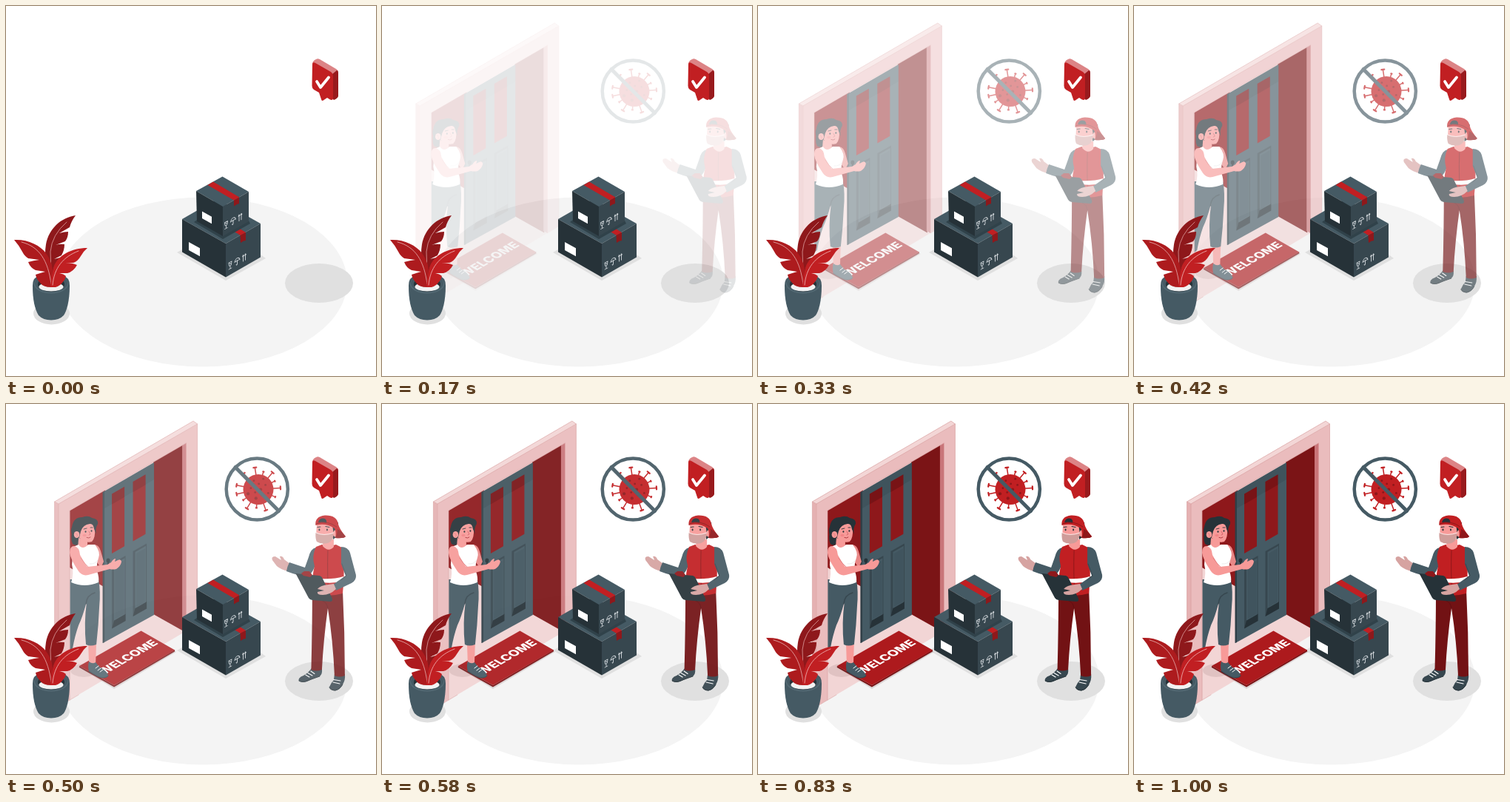
Write an HTML page with a canvas that moves like this. It is 500 px wide and 500 px high and loops after 1.04 s.

```html
<!DOCTYPE html>
<html lang="en">
<head>
<meta charset="utf-8">
<title>Doorstep delivery</title>
<style>
html, body { margin: 0; width: 100%; height: 100%; overflow: hidden; background: #fff; }
canvas { display: block; width: 500px; height: 500px; }
</style>
</head>
<body>
<canvas id="stage"></canvas>
<script>
const SIZE = 500, LOOP = 1040, STEP = 1000 / 24;
const dpr = window.devicePixelRatio || 1;
const INK = '#263238', SLATE = '#37474f', STEEL = '#455a64';
const RED = '#c11f22', DEEP = '#7b1416', WINE = '#8e181b';
const SKIN = '#f79a98', GLOVE = '#d6a3a1', SHADE = '#e0e0e0';
const PINK = '#eabcbd', PALE = '#f2d5d5', ROSE = '#c97579';

const stage = document.getElementById('stage');
const layer = document.createElement('canvas');
stage.width = stage.height = layer.width = layer.height = SIZE * dpr;
const view = stage.getContext('2d'), buffer = layer.getContext('2d');
let g = view;

const cache = {};
const shape = d => cache[d] || (cache[d] = new Path2D(d));

function fill(color, d) {
  g.fillStyle = color;
  g.fill(shape(d));
}

function line(color, width, d) {
  g.strokeStyle = color;
  g.lineWidth = width;
  g.lineCap = g.lineJoin = 'round';
  g.stroke(shape(d));
}

function oval(color, x, y, rx, ry = rx) {
  g.fillStyle = color;
  g.beginPath();
  g.ellipse(x, y, rx, ry, 0, 0, Math.PI * 2);
  g.fill();
}

// Upright panel whose top and bottom edges follow the isometric slope
function panel(color, x, y, w, h, slope = -0.57) {
  g.fillStyle = color;
  g.beginPath();
  g.moveTo(x, y);
  g.lineTo(x + w, y + w * slope);
  g.lineTo(x + w, y + w * slope + h);
  g.lineTo(x, y + h);
  g.fill();
}

function ground() {
  oval('#f4f4f4', 266, 373, 195, 114.5);
  oval(SHADE, 423, 374.5, 46, 26.5);
  oval(SHADE, 61.5, 415.5, 24.5, 15);
  fill(SHADE, 'M238 329L231 333 297 371 351 341 344 336Z');
}

function careIcons(x, y) {
  g.save();
  g.transform(1, -0.57, 0, 1, x, y);
  line('#d5dade', 0.8, 'M-2-4H2L1.5 0Q0 2-1.5 0ZM0 1V5M-2 5H2M-1-3L1-1');
  line('#d5dade', 0.9, 'M6 0Q7-4 9-4Q12-4 13 0Q11-1 9.5 0Q8-1 6 0M9.5-1V4Q9 6 8 4');
  line('#d5dade', 0.9, 'M17.5 5V-3M20.5 5V-3M16.6-1.8L17.5-3.5 18.4-1.8M19.6-1.8L20.5-3.5 21.4-1.8');
  g.restore();
}

function boxes() {
  fill(STEEL, 'M238 288L285 261 344 294 297 321Z');
  fill(INK, 'M238 288L297 321V366.500L238 332.500Z');
  fill(SLATE, 'M297 321L344 294V339.500L297 366.500Z');
  fill(RED, 'M304.500 302.500L312 298.500 324 306 317 310Z');
  fill(WINE, 'M316.500 310L324 306V317L321 317.500 317 320Z');
  panel('#fff', 247, 319, 15, 11, 0.55);
  careIcons(303, 350);
  fill('#30424a', 'M258 289L293 309 328 290 330 294 293 315 254 292Z');
  fill(STEEL, 'M292.500 230.500L328 251 293 271 257 250Z');
  fill(INK, 'M257 250L293 271V311L258 291Z');
  fill(SLATE, 'M293 271L328 251V291L293 311Z');
  fill(RED, 'M272.500 242L280 237.500 315.500 258.500 308 262.500Z');
  fill(WINE, 'M308 262.500L315 258.500V267L312 268 308 270.500Z');
  panel('#fff', 265, 277.5, 13, 9.5, 0.55);
  careIcons(297.5, 295.5);
}

function plant() {
  fill(STEEL, 'M36 378Q36 366 45 365H77Q86 366 86 378C86 399 82 412 78 418Q72 424.500 61 424.500Q50 424.500 44 418C39 410 36 397 36 378Z');
  oval('#546a74', 61, 376, 23, 12.5);
  oval(STEEL, 61, 375, 22, 12);
  oval(INK, 61, 376, 18, 10);
  oval('#f2f2f2', 61, 379.5, 16.5, 6);
  fill(WINE, 'M94 283C74 286 58 301 54 322C51 340 55 358 59 374L64 370 65 352Q71 347 73 340L65 342 75 337Q79 330 79 322Q73 321 67 323L80 318Q84 313 84 305Q79 305 72 307L86 299Q88 291 94 283Z');
  line('#dda0a0', 0.8, 'M82 292Q62 309 60 332L61 360');
  fill('#ad1b1e', 'M11 316C29 315 46 323 54 334Q61 343 63 356L61 380Q50 380 46 374Q41 369 40 363Q46 361 53 359L40 357Q33 354 30 346Q37 344 45 343L30 341Q25 338 22 332Q18 324 11 316Z');
  line('#e7b2b2', 0.8, 'M21 319C45 325 57 344 61 376');
  fill(RED, 'M110 327C88 327 71 337 65 351Q61 364 60 380L67 380Q73 378 76 374Q80 370 81 365Q78 362 72 361L83 361Q91 359 96 350Q90 347 80 347L91 347Q97 345 101 338Q104 332 110 327Z');
  line('#f0bcbc', 0.8, 'M98 331C77 339 65 354 63 377');
}

function badge() {
  fill('#dc8486', 'M414 79Q414 75 417 73L420 71.500Q422 71 424 72L446 85Q448 86 448.500 88L442 93Z');
  fill('#981a1d', 'M441 92L447 87Q449 87 449 90V122Q448 125 443 127L440 124Z');
  fill(RED, 'M414 79Q414 75 418 77L439 89Q442 91 442 95V124Q442 128 438 126.500L434 124 428 128Q426 128 426 126L423 117 416 113Q413.500 111 413.500 108Z');
  line('#fff', 3.8, 'M420 102L425 110 436 96.500');
}

function spike(deg, r, cap) {
  g.save();
  g.translate(341, 115.5);
  g.rotate(deg * Math.PI / 180);
  line(RED, 1.5, `M17 0H${r}`);
  line(RED, 2.2, `M${r}-${cap}V${cap}`);
  g.restore();
}

function virus() {
  for (const a of [-99, -50, -4, 70, 121, 168, 191]) spike(a, 30, 2);
  for (const a of [-74, -27, 24, 96, 145]) spike(a, 25, 0.6);
  spike(227, 29, 2);
  oval(RED, 341, 115.5, 20.5);
  for (let i = 0; i < 11; i++) {
    const a = i * 2.4, r = 4.9 * Math.sqrt(i + 0.4);
    oval('#8d171a', 341 + r * Math.cos(a), 115.5 + r * Math.sin(a), i % 3 ? 1.4 : 2.1);
  }
  g.strokeStyle = STEEL;
  g.lineWidth = 4.5;
  g.beginPath();
  g.arc(339.3, 115, 41.6, 0, Math.PI * 2);
  g.stroke();
  line(STEEL, 5, 'M310 85.500L368.600 144.500');
}

function doorway() {
  fill(PALE, 'M92 144L249 53V307L92 400Z');
  fill(WINE, 'M92 144L140 116V248L92 221Z');
  fill(DEEP, 'M205 78L245 55V306.500L205 284Z');

  // Open door
  fill(STEEL, 'M137 119L206 79V285L137 323Z');
  fill('#2f3f47', 'M136.500 119L139 118V322L136.500 323Z');
  fill('rgba(38,50,56,.18)', 'M139 118L206 79V102L139 141Z');
  for (const [x, y] of [[149, 121.5], [177.5, 105]]) {
    panel(WINE, x, y, 17, 80.5);
    panel('rgba(70,10,14,.3)', x, y, 17, 14);
    panel(SLATE, x, y + 94, 18.5, 88);
    fill(INK, `M${x} ${y + 182}L${x + 3} ${y + 171} ${x + 18.5} ${y + 162}V${y + 171.5}Z`);
    panel(STEEL, x + 3, y + 95, 14.5, 76);
    panel('#40545e', x + 4.5, y + 97, 12, 72);
  }
  oval(INK, 144, 211.5, 2.5, 3);
  line(INK, 2, 'M144 212V217');

  // Casing
  fill(PINK, 'M77 134L264.500 27V298L249 307.500V53L92 144V400L77 409Z');
  fill(ROSE, 'M244 56L249.500 52.500V307L244 304Z');
  fill('#f3d6d6', 'M71.500 132L259 23 264.500 27 77 135Z');
  fill('#e5b1b2', 'M71.500 132L77 135V408L71.500 405Z');
  line('#d99fa0', 0.7, 'M71.500 405V132L259 23 264.500 27 77 135V408M71.500 132L77 135M264.500 27V298M92 400V144L249 53');
  line('#dfa9aa', 0.7, 'M77 409L104 393');
}

function mat() {
  fill('rgba(90,60,60,.16)', 'M103 355L152 385 236 335 232 332Z');
  fill(DEEP, 'M105 354L152 380 234 332V334.500L152 382.500 105 356Z');
  fill('#ad1a1d', 'M105 354L188.500 306.500 234 332.500 152 380Z');
  g.save();
  g.transform(0.866, -0.5, 0.866, 0.5, 170.5, 342);
  g.fillStyle = '#fff';
  g.font = '800 16.2px Inter, Roboto, sans-serif';
  g.textAlign = 'center';
  g.textBaseline = 'alphabetic';
  g.fillText('WELCOME', 0, 5.9);
  g.restore();
  oval('rgba(70,30,30,.1)', 111, 360, 18, 9);
}

function woman() {
  // Legs and shoe
  fill(SKIN, 'M117 322H128L127 352Q122 355 118 351Z');
  fill(STEEL, 'M118 348Q123 352 127 349L132 355Q142 361 144 366Q143 371 135 370Q126 366 118 361Q116 354 118 348Z');
  line(SLATE, 1.2, 'M118 361Q129 369 136 370Q142 370 144 367');
  line('#fff', 1, 'M127 357L131 354M130 360L134 357M133 362L137 359');
  fill(STEEL, 'M92.500 237H131Q134 253 132 274Q131 299 128 325Q120 328 114 325Q111 296 115 267Q109 289 104 299Q99 313 96 330L92.500 333Z');
  line(SLATE, 1.5, 'M114 270Q115 258 126 255');

  // Hair, far arm, torso
  fill(INK, 'M97 166Q92 181 96 189Q101 193 106 188L110 166Z');
  fill('#e98786', 'M126 190Q132 191 134 199L138 213 134 221 124 207Z');
  fill(SKIN, 'M104 181L116 184 116 193Q111 200 103 194Z');
  fill('#fff', 'M97 193L104 190Q109 198 117 190L126 190Q134 200 131 208Q128 215 129 226Q132 234 131 241Q112 249 94 241Q98 229 95 217Z');
  line('#e7e7e7', 0.8, 'M119 216Q126 217 130 211');

  // Near arm
  fill(SKIN, 'M98 192Q92 192 92 201Q93 210 104 226Q109 233 117 231L146 223Q150 224 155 223Q161 219 162 213Q161 209 157 211L153 213 154 209Q151 209 148 214L143 217 116 220Q112 215 106 204Q105 193 98 192Z');
  line('#dc7779', 0.8, 'M107 208Q112 216 117 220');

  // Head
  fill(SKIN, 'M104 165Q106 157 116 157Q126 158 126 168Q127 181 122 186Q115 188 109 184L103 179Z');
  fill(INK, 'M95 166Q97 153 109 153Q117 150 122 154Q131 155 130 162Q126 168 128 176L125 169Q124 161 119 162Q110 163 107 172L105 180Q98 181 95 176Q93 171 95 166Z');
  oval(SKIN, 101.5, 176.5, 3.8, 4.5);
  line('#d87376', 0.7, 'M100 175Q103 175 102 179');
  oval(INK, 113.5, 172.5, 1, 1.3);
  oval(INK, 121.5, 171.5, 1, 1.3);
  line(INK, 0.9, 'M111 169L115 168M120 167L123 167');
  line('#c95058', 0.7, 'M118 172L120 176 118 177');
  line('#a92d35', 0.9, 'M115 180.500Q118 182 120 180');
  oval('rgba(232,94,103,.35)', 112, 177.5, 2.5, 1.8);
}

function shoes() {
  fill(SLATE, 'M407 357L421 358Q422 365 418 368Q408 371 401 375Q394 377 390 374.500Q388 370 396 367Q403 363 407 357Z');
  fill(SLATE, 'M438 365L452 365Q453 373 449 379Q446 386 439 387.500Q432 387 431 382.500Q433 377 437 373Z');
  line(INK, 1, 'M390 374Q395 377 401 374L418 368M431 383Q433 387 439 387Q446 385 449 379');
  line('#fff', 1.2, 'M399 366L404 369M402 363.500L408 367M406 361L411 364.500M436 376L445 378M437 372.500L446 374');
}

function courier() {
  shoes();
  fill('#721214', 'M408 250H449Q452 309 452 367Q445 370 438 367Q436 320 429 276Q423 319 421 359Q413 362 406.500 359Q408 303 408 250Z');
  line('#5f0f11', 1, 'M429 276Q428 268 422 266');

  // Far arm with open hand
  fill(GLOVE, 'M378 216L370 210Q368 205 364 206L366 211 358 206Q352 206 354 211L360 219Q366 224 375 226Z');
  fill(STEEL, 'M413 194Q406 195 403 207L398 221 377 214Q374 220 373 226Q391 233 402 233Q409 229 415 210Z');

  // Torso
  fill(RED, 'M413 193L421 190Q430 193 440 190L448 194Q453 225 449 256Q427 262 408 256Q407 235 411 219Q407 205 413 193Z');
  fill(SKIN, 'M423 183H437V193Q430 201 422 192Z');
  line('#8f171a', 1, 'M429 198Q428 230 430 258');
  fill('#fff', 'M420 236Q437 237 450 233V239Q437 243 421 241Z');

  // Clipboard
  fill(INK, 'M385.500 229L418 232Q421 233 422 236L435 263Q436 267 432 267L408 265Q405 265 403 262Z');
  fill(WINE, 'M393 229L397 226 404 226 408 231 405 234 396 232Z');

  // Near arm
  fill(STEEL, 'M447 193Q456 193 459 201L467 231Q468 238 461 242L440 252 436 244 453 232 447 216Z');
  line(SLATE, 1, 'M448 216L454 232 447 238');
  fill(GLOVE, 'M415 250Q419 245 430 244L437 243 440 250Q432 258 422 258Q414 258 415 254L424 252Z');

  // Head
  fill(INK, 'M432 160H443L443 178 436 183Z');
  fill(SKIN, 'M414 164Q423 157 435 162L437 177Q434 187 426 187Q415 186 413 179Z');
  oval(SKIN, 440, 175, 3.8, 4.8);
  fill('#cf9d9a', 'M412.500 174Q423 179 436 175Q437 185 429 188Q420 190 414 186Q412 182 412.500 174Z');
  line('#fff', 0.8, 'M413 174Q423 179 437 174');
  oval(INK, 417.5, 170, 1, 1.4);
  oval(INK, 428, 170, 1, 1.4);
  line(INK, 1.1, 'M415 166.500L419 166M426 165.500L431 166.500');

  // Cap worn backwards
  fill(RED, 'M412.500 164Q411 152 425 150.500Q441 150 443 162Q444 168 453 179Q451 182 439 181Q441 174 438 168Q426 160 412.500 164Z');
  fill('#8f171a', 'M442 169Q447 171 453 179Q451 182 439 181Q442 176 442 169Z');
  fill(INK, 'M416 160Q418 153 425 155Q428 157 427 161Q422 159 416 160Z');
  line('#8f171a', 1, 'M413 162Q427 156 441 166');
}

// cubic-bezier(.36, -.01, .5, 1.38)
function ease(x) {
  if (x >= 1) return 1;
  const bez = (a, b, s) => 3 * a * s * (1 - s) ** 2 + 3 * b * s * s * (1 - s) + s ** 3;
  let lo = 0, hi = 1;
  for (let i = 0; i < 24; i++) {
    const mid = (lo + hi) / 2;
    if (bez(0.36, 0.5, mid) < x) lo = mid; else hi = mid;
  }
  return bez(-0.01, 1.38, lo);
}

// Draw a group as one flat layer, shifted and faded
function group(dx, alpha, ...parts) {
  g = buffer;
  g.setTransform(1, 0, 0, 1, 0, 0);
  g.clearRect(0, 0, layer.width, layer.height);
  g.setTransform(dpr, 0, 0, dpr, dx * dpr, 0);
  parts.forEach(part => part());
  g = view;
  g.globalAlpha = Math.max(0, Math.min(1, alpha));
  g.drawImage(layer, 0, 0, SIZE, SIZE);
  g.globalAlpha = 1;
}

function draw(ms) {
  const tick = Math.min(24, Math.floor((ms % LOOP + 6) / STEP));
  g.setTransform(dpr, 0, 0, dpr, 0, 0);
  g.fillStyle = '#fff';
  g.fillRect(0, 0, SIZE, SIZE);
  ground();
  if (tick > 1) {
    const p = ease(tick / 24 + 0.032), shift = 30 * (1 - p);
    group(-shift, p, doorway, mat, woman);
    group(shift, p, courier);
    group(0, p, virus);
  }
  boxes();
  plant();
  badge();
}

let start;
function loop(now) {
  if (start === undefined) start = now;
  draw(Math.max(0, now - start));
  requestAnimationFrame(loop);
}
draw(0);
requestAnimationFrame(loop);
</script>
</body>
</html>
```
